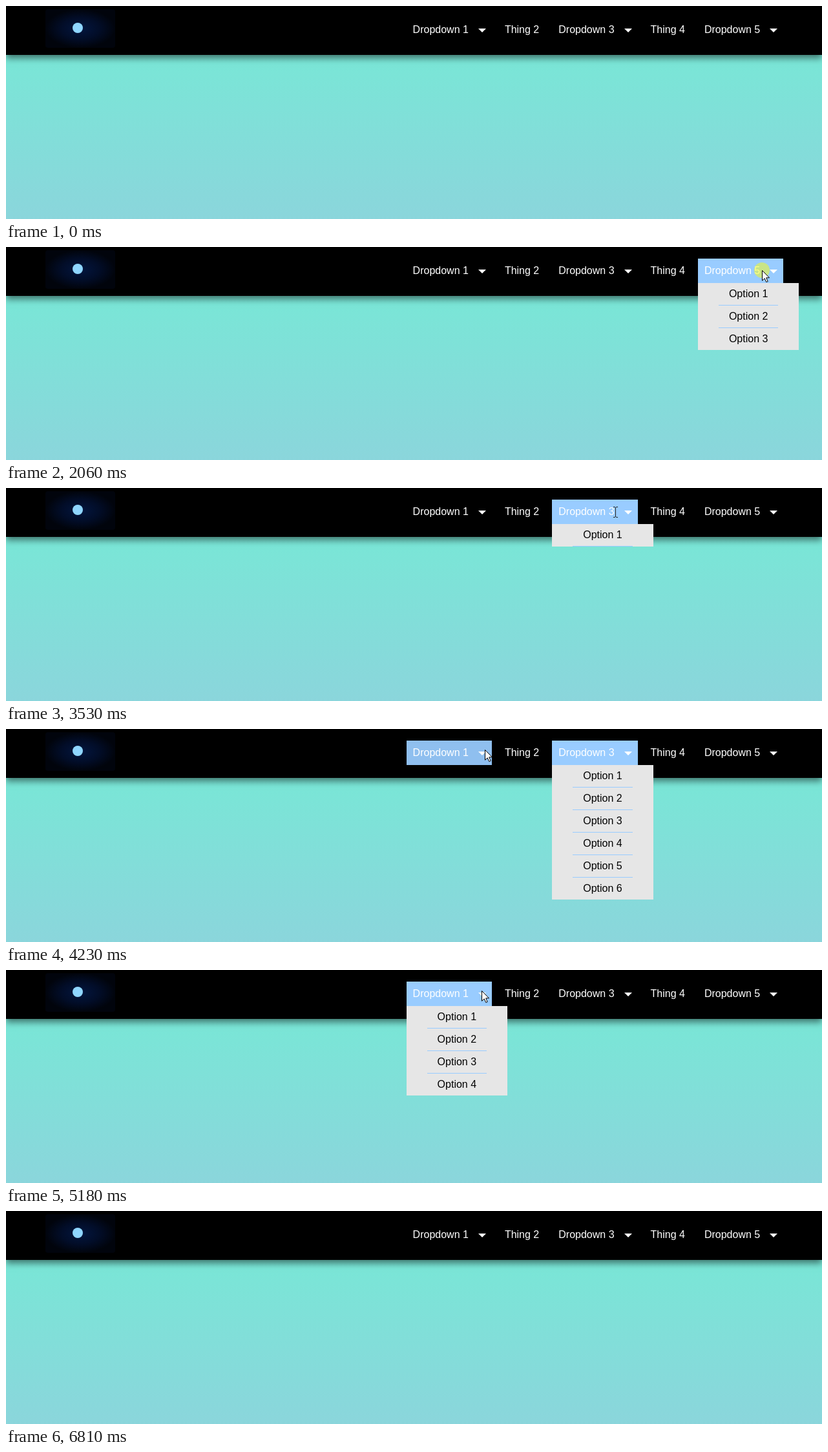
Animation of 1263x331 px, one loop 7.59 s. Source, as an HTML page:

```html
<!DOCTYPE html>
<html lang="en">
<head>
<meta charset="utf-8">
<title>Dropdown navigation</title>
<style>
html, body { margin: 0; width: 100%; height: 100%; overflow: hidden; }
body {
  position: relative;
  font: 16px/18px "Liberation Sans", Arial, sans-serif;
  background: linear-gradient(#74ebd5, #acb6e5) 0 0 / 100% 820px no-repeat;
}
nav { position: absolute; inset: 0 0 auto; height: 76px; background: #000; box-shadow: 0 5px 10px rgba(0, 0, 0, .5); }
.logo {
  position: absolute; left: 61px; top: 5px; width: 108px; height: 60px; border-radius: 4px;
  background: radial-gradient(closest-side, #03163f, #020d28 55%, #01040c);
}
.logo::after {
  content: ""; position: absolute; left: 42px; top: 21px; width: 16px; height: 16px;
  border-radius: 50%; background: #8fd6ff;
}
#bar { position: absolute; left: 619.6px; top: 18px; display: flex; gap: 10px; color: #fff; }
.item { position: relative; padding: 10px; white-space: nowrap; }
.label, .caret { display: inline-block; }
.caret { margin: 0 -1px 0 15px; vertical-align: 1px; border: solid transparent; border-width: 6px 6px 0; border-top-color: #fff; }
.menu { position: absolute; left: 0; top: 38px; height: 0; overflow: hidden; background: #e6e6e6; color: #000; }
.option { margin: 0 32px; padding: 8px 16px; border-bottom: 1px solid #9cf; }
.option:last-child { border: 0; }
svg { position: absolute; left: 0; top: 0; overflow: visible; }
</style>
</head>
<body>
<nav>
  <div class="logo"></div>
  <div id="bar"></div>
</nav>
<svg id="cursor" width="1" height="1">
  <circle id="click" r="12" fill="#ff0" fill-opacity=".47"/>
  <path id="arrow" d="M.5 .5V16.2L4.2 12.8 6.8 18.5 9.2 17.5 6.7 11.8H11.5Z" fill="#fff" stroke="#000"/>
  <path id="beam" d="M-3 -7.5H-1L.5 -6.5 2 -7.5H4M.5 -6.5V7.5M-3 8.5H-1L.5 7.5 2 8.5H4" fill="none" stroke="#222"/>
</svg>
<script>
const LOOP = 7590, FADE = 190, SLIDE = 560, SLIDE_MAX = 1000, MOVE = 200;
const $ = id => document.getElementById(id);

// Times in ms: hover lights an item, open and close are clicks, leave dims it
const items = [
  { label: "Dropdown 1", options: 4, hover: 4100, open: 4600, close: 5774, leave: 6600 },
  { label: "Thing 2" },
  { label: "Dropdown 3", options: 6, hover: 3080, open: 3502, close: 4600, leave: 4600 },
  { label: "Thing 4" },
  { label: "Dropdown 5", options: 3, hover: 790, open: 1225, close: 2050, leave: 3000 }
];
const dropdowns = items.filter(item => item.options);

// The pointer sets off at each time towards x, y
const start = { x: 1241, y: 37 };
const moves = [
  { time: 740, x: 1170, y: 36 },
  { time: 2990, x: 943, y: 37 },
  { time: 4070, x: 736, y: 32 },
  { time: 6580, x: 911, y: 331 }
];

function add(parent, className, text = "") {
  const el = document.createElement("div");
  el.className = className;
  el.textContent = text;
  return parent.appendChild(el);
}

for (const item of items) {
  item.el = add($("bar"), "item");
  item.text = add(item.el, "label", item.label);
  if (!item.options) continue;
  add(item.el, "caret");
  item.menu = add(item.el, "menu");
  for (let i = 1; i <= item.options; i++) add(item.menu, "option", "Option " + i);
}

// CSS "ease": cubic-bezier(.25, .1, .25, 1)
function ease(x) {
  if (x <= 0 || x >= 1) return x <= 0 ? 0 : 1;
  const bezier = (s, a, b) => 3 * (1 - s) * s * ((1 - s) * a + s * b) + s ** 3;
  let lo = 0, hi = 1;
  for (let i = 0; i < 24; i++) {
    const mid = (lo + hi) / 2;
    if (bezier(mid, .25, .25) < x) lo = mid; else hi = mid;
  }
  return bezier(lo, .1, 1);
}

const transition = (t, on, off, duration) => ease((t - on) / duration) - ease((t - off) / duration);
const show = (el, visible) => el.style.display = visible ? "" : "none";

function pointerAt(t) {
  let { x, y } = start;
  for (const move of moves) {
    const k = ease((t - move.time) / MOVE);
    x += (move.x - x) * k;
    y += (move.y - y) * k;
  }
  return [Math.round(x), Math.round(y)];
}

function isOverLabel(x, y) {
  return items.some(({ text }) => {
    const box = text.getBoundingClientRect();
    return x >= box.left && x <= box.right + 2 && y < box.bottom;
  });
}

function drawDropdown({ el, menu, options, hover, open, close, leave }, t) {
  el.style.background = `rgba(153, 204, 255, ${transition(t, hover, leave, FADE).toFixed(3)})`;
  const height = SLIDE_MAX * transition(t, open, close, SLIDE);
  menu.style.height = Math.round(Math.min(options * 35 - 1, height)) + "px";
}

function drawPointer(t) {
  const [x, y] = pointerAt(t);
  const overLabel = isOverLabel(x, y);
  $("cursor").style.transform = `translate(${x}px, ${y}px)`;
  show($("cursor"), t >= moves[0].time && t < moves.at(-1).time + MOVE / 2);
  show($("click"), dropdowns.some(d => [d.open, d.close].some(time => t >= time - 50 && t < time + 25)));
  show($("arrow"), !overLabel);
  show($("beam"), overLabel);
}

function frame(now) {
  const t = now % LOOP;
  for (const dropdown of dropdowns) drawDropdown(dropdown, t);
  drawPointer(t);
  requestAnimationFrame(frame);
}
frame(performance.now());
</script>
</body>
</html>
```
